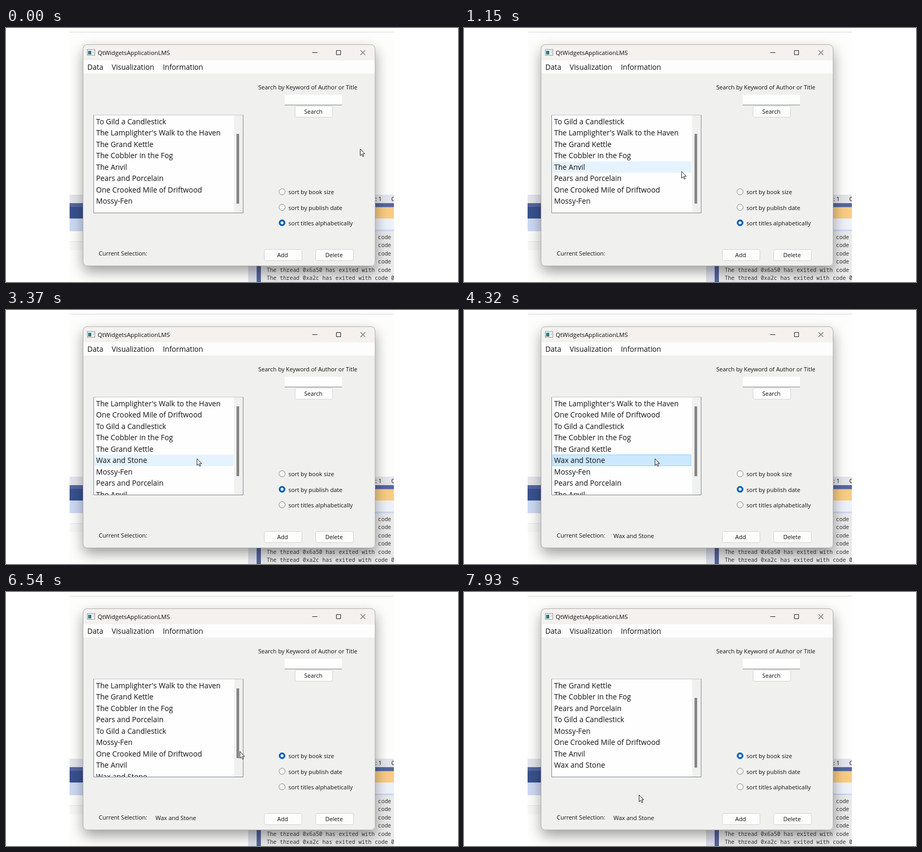
Write an HTML page that moves like this. It is 853 px wide and 480 px high and loops after 8000 ms.

```html
<!DOCTYPE html>
<html lang="en">
<head>
<meta charset="utf-8">
<title>Library list</title>
<style>
  html, body { margin: 0; width: 100%; height: 100%; overflow: hidden; background: #fff; }
  svg { display: block; width: 853px; height: 480px; }
  text { font: 11px "Open Sans", "Noto Sans", sans-serif; fill: #111; white-space: pre; }
  .caption { font-size: 11.3px; }
  .menu text { font-size: 13.7px; }
  .rows text { font-size: 13.8px; }
  .console text { font: 10.3px "Noto Sans Mono", "DejaVu Sans Mono", monospace; fill: #333; }
  .button rect { fill: #fdfdfd; stroke: #d3d3d3; }
  .button text { text-anchor: middle; }
  .ring { fill: #f7f7f6; stroke: #868686; }
  .on .ring { fill: #0f62b6; stroke: #0f62b6; }
  .dot { fill: #fff; display: none; }
  .on .dot { display: inline; }
</style>
</head>
<body>
<svg viewBox="0 0 853 480">
  <defs>
    <clipPath id="screen"><rect x="120" width="612" height="480"/></clipPath>
    <clipPath id="view"><rect x="166" y="165" width="264" height="184"/></clipPath>
    <filter id="blur" x="-20%" y="-20%" width="140%" height="140%"><feGaussianBlur stdDeviation="13"/></filter>
  </defs>

  <g clip-path="url(#screen)">
    <rect x="120" width="612" height="480" fill="#fdfdfb"/>
    <rect x="120" y="7" width="612" height="1.6" fill="#e4e2f0"/>
    <rect x="120" y="315" width="612" height="16" fill="#e4e4ec"/>
    <rect x="120" y="331" width="612" height="8" fill="#5565a0"/>
    <rect x="120" y="338" width="337" height="22" fill="#38528f"/>
    <rect x="457" y="338.500" width="275" height="21.500" fill="#f9cc83"/>
    <rect x="120" y="360" width="337" height="24" fill="#cdd9f3"/>
    <rect x="457" y="360" width="275" height="24" fill="#edf1fa"/>
    <rect x="457" y="381" width="275" height="3" fill="#cad8f2"/>
    <rect x="120" y="403" width="337" height="1" fill="#e6e6e6"/>
    <rect x="120" y="404" width="337" height="16" fill="#f7f7f7"/>
    <rect x="457" y="384" width="275" height="96" fill="#e9e9e9"/>
    <rect x="457" y="384" width="16" height="96" fill="#dcdeea"/>
    <rect x="473" y="384" width="8" height="96" fill="#54639c"/>
    <rect x="146" y="42" width="551" height="418" rx="8" opacity=".38" filter="url(#blur)"/>
    <text x="697" y="327">: 1</text><text x="727" y="327">C</text>
    <g class="console" id="console"></g>
  </g>

  <rect x="146" y="32" width="551" height="418" rx="7" fill="#f0f0ef"/>
  <path d="M146 61V39a7 7 0 0 1 7-7H690a7 7 0 0 1 7 7V61Z" fill="#f4f1ee"/>
  <rect x="146" y="61" width="551" height="25" fill="#fdfdfd"/>
  <rect x="145.500" y="31.500" width="551" height="418" rx="7.500" fill="none" stroke="#b2b1b0"/>
  <rect x="153.500" y="40.500" width="14" height="11" fill="#fafafa" stroke="#8d9499"/>
  <rect x="155" y="43" width="6" height="7" fill="#297f80"/>
  <path d="M163 43.500h3M163 46.500h3" stroke="#a3adb3"/>
  <text class="caption" x="173" y="51">QtWidgetsApplicationLMS</text>
  <path d="M578 46.500h9.500M623.500 42.500h8v8h-8zM669 42l9 9M678 42l-9 9" fill="none" stroke="#222"/>
  <g class="menu">
    <text x="153.500" y="79">Data</text>
    <text x="199.500" y="79">Visualization</text>
    <text x="296" y="79">Information</text>
  </g>

  <text x="476" y="116">Search by Keyword of Author or Title</text>
  <rect x="526" y="126" width="108" height="20" fill="#fefefe"/>
  <path d="M526 145.500h108" stroke="#78867d"/>
  <g id="buttons"></g>
  <g id="radios"></g>
  <text x="175" y="429.500">Current Selection:</text>
  <text x="282" y="431" id="choice"></text>

  <rect x="165.500" y="164.500" width="282" height="185" fill="#fefefe"/>
  <path d="M165.500 164.500h282" stroke="#c3c6ca"/>
  <path d="M165.500 164.500v185h282v-185" fill="none" stroke="#7d8790"/>
  <rect x="430.500" y="165" width="16.500" height="184" fill="#f0f0ef"/>
  <rect id="thumb" x="435" width="5" height="132" rx="1" fill="#858585"/>
  <g class="rows" clip-path="url(#view)">
    <rect id="hover" x="167" width="262" height="21.500" fill="#e5f3ff"/>
    <rect id="mark" x="167.500" y="273.500" width="261" height="21" fill="#cce8ff" stroke="#99d1f7"/>
    <g id="rows"></g>
  </g>
  <path id="cursor" d="M.5 .5V13.300L3.400 10.500 5.400 15 7.400 14.100 5.400 9.700H9.200Z" fill="#fff" stroke="#222" stroke-linejoin="round"/>
</svg>

<script>
const $ = id => document.getElementById(id);
const LOOP = 8000, ROW = 21.45, TOP = 166.3;
const SCROLL_UP = 1400, BY_DATE = 2420, PICK = 3810, BY_SIZE = 5780, SCROLL_DOWN = 6790;

const book = (title, year, pages) => ({ title, year, pages });
const byTitle = [
  book("Wax and Stone", 1869, 1300),
  book("To Gild a Candlestick", 1960, 330),
  book("The Lamplighter's Walk to the Haven", 1979, 170),
  book("The Grand Kettle", 1925, 180),
  book("The Cobbler in the Fog", 1951, 230),
  book("The Anvil", 1455, 1200),
  book("Pears and Porcelain", 1813, 280),
  book("One Crooked Mile of Driftwood", 1967, 420),
  book("Mossy-Fen", 1851, 380)
];
const byDate = byTitle.toSorted((a, b) => b.year - a.year);
const bySize = byTitle.toSorted((a, b) => a.pages - b.pages);

// pointer stops: x, y, arrival, departure
const stops = [
  [668, 228, 0, 190], [535, 341, 640, 640], [349, 236, 1400, 1400], [441, 285, 1910, 1910],
  [517, 335, 2230, 2600], [345, 232, 3180, 3180], [360, 280.5, 3370, 5270],
  [517, 306, 5650, 6160], [441, 301, 6540, 6540], [345, 238, 6980, 7810], [330, 383, 7870, LOOP]
];

function pointer(t) {
  const i = stops.findLastIndex(s => s[2] <= t);
  const [x, y, , leave] = stops[i];
  if (t <= leave) return [x, y];
  const [nextX, nextY, arrive] = stops[i + 1];
  const k = (t - leave) / (arrive - leave);
  return [x + (nextX - x) * k, y + (nextY - y) * k];
}

// The picture advances in bursts whose steps last 60 and 130 ms by turns.
const burst = n => 200 + 890 * n - 70 * Math.ceil(n / 3);

function stepTime(t) {
  if (t < burst(0)) return 0;
  let n = 0;
  while (burst(n + 1) <= t) n++;
  const first = n % 3 ? 130 : 60, since = t - burst(n), rest = since % 190;
  return t - rest + (rest >= first ? first : 0);
}

function rowAt(t) {
  const [x, y] = pointer(t);
  return x > 166 && x < 430 && y > TOP && y < 349 ? Math.floor((y - TOP) / ROW) : -1;
}

// A row stays lit briefly while the pointer crosses to the scroll bar.
function hoverRow(t) {
  const x = pointer(t)[0];
  return rowAt(x >= 430 && x < 447 ? t - 190 : t);
}

$("console").innerHTML = ["3f1c", "58d4", "1b90", "47e8", "6a50", "a2c"].map((id, i) =>
  `<text x="492" y="${398.5 + i * 15.5}">The thread 0x${id} has exited with code 0</text>`).join("");

$("buttons").innerHTML = [["Search", 545, 146.5], ["Add", 487, 418], ["Delete", 584, 418]].map(([label, x, y]) =>
  `<g class="button"><rect x="${x + .5}" y="${Math.round(y) + .5}" width="71" height="21" rx="3"/>
   <text x="${x + 35}" y="${y + 15}">${label}</text></g>`).join("");

$("radios").innerHTML = ["sort by book size", "sort by publish date", "sort titles alphabetically"].map((label, i) => {
  const y = 309.5 + i * 29.3;
  return `<g><circle class="ring" cx="521" cy="${y}" r="5.8"/><circle class="dot" cx="521" cy="${y}" r="2.7"/>
    <text x="533" y="${y + 4.7}">${label}</text></g>`;
}).join("");

$("rows").innerHTML = byTitle.map((_, i) => `<text x="170" y="${182 + i * ROW}"></text>`).join("");

const show = (node, on) => node.setAttribute("visibility", on ? "visible" : "hidden");
let drawn = -1;

function draw(t) {
  if (t === drawn) return;
  drawn = t;
  const radio = t < BY_DATE ? 2 : t < BY_SIZE ? 1 : 0;
  const list = [bySize, byDate, byTitle][radio];
  const top = t < SCROLL_UP || t >= SCROLL_DOWN ? 1 : 0;
  const row = hoverRow(t);
  [...$("rows").children].forEach((line, i) => line.textContent = list[i + top]?.title ?? "");
  [...$("radios").children].forEach((group, i) => group.classList.toggle("on", i === radio));
  $("thumb").setAttribute("y", 182 + top * 18);
  $("hover").setAttribute("y", TOP + row * ROW);
  show($("hover"), row >= 0);
  show($("mark"), t >= PICK && t < BY_SIZE);
  $("choice").textContent = t >= PICK ? byTitle[0].title : "";
  $("cursor").setAttribute("transform", `translate(${pointer(t)})`);
}

function frame() {
  draw(stepTime(performance.now() % LOOP));
  requestAnimationFrame(frame);
}
frame();
</script>
</body>
</html>
```
